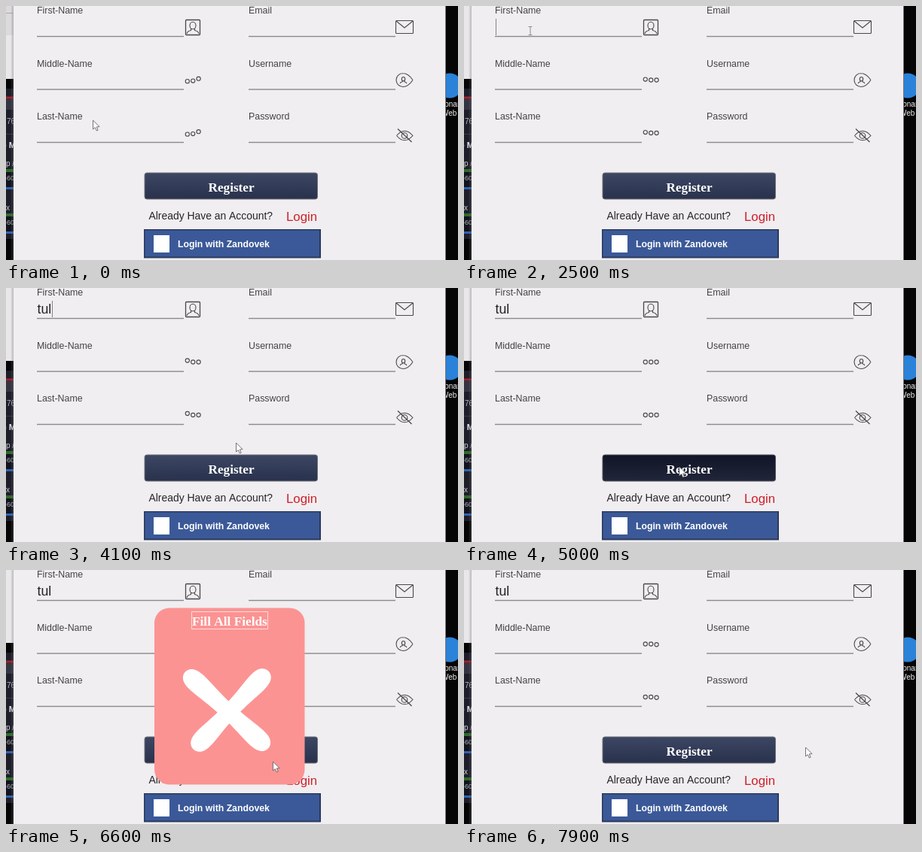
Animation, 600 px wide and 338 px high, one loop 8 s. Source, as an HTML page with a canvas:

```html
<!DOCTYPE html>
<html lang="en">
<head>
<meta charset="utf-8">
<title>Register form</title>
<style>
html, body { margin: 0; width: 100%; height: 100%; overflow: hidden; background: #000; }
canvas { display: block; width: 600px; height: 338px; }
</style>
</head>
<body>
<canvas id="stage" width="600" height="338"></canvas>
<script>
const c = document.getElementById('stage').getContext('2d');
const LOOP = 8000, POPUP_ON = 5200, POPUP_OFF = 7400;
const SANS = '"Liberation Sans", Arial, sans-serif';
const SERIF = '"Liberation Serif", "Times New Roman", serif';
const INK = '#4a484c';

// time, x, y of the pointer
const PATH = [
  [0, 115, 152], [300, 115, 152], [1500, 88, 33], [3200, 88, 33],
  [4100, 305, 206], [4500, 285, 238], [5700, 286, 238],
  [6600, 354, 255], [7200, 453, 236], [8000, 453, 236]
];
const TYPED = 'tul', KEYS = [2700, 2850, 3000];
const FOCUS = 2200, BLUR = 4950, BLINK = 530;

function rect(x, y, w, h, fill) { c.fillStyle = fill; c.fillRect(x, y, w, h); }

function text(s, x, y, font, fill) {
  c.font = font; c.fillStyle = fill; c.fillText(s, x, y);
}

function round(x, y, w, h, r) { c.beginPath(); c.roundRect(x, y, w, h, r); }

function circle(x, y, r) { c.beginPath(); c.arc(x, y, r, 0, 7); }

function ink(w = 1.1, color = INK) { c.lineWidth = w; c.strokeStyle = color; c.stroke(); }

function shade(x0, y0, x1, y1, a, b) {
  const g = c.createLinearGradient(x0, y0, x1, y1);
  g.addColorStop(0, a); g.addColorStop(1, b);
  return g;
}

function pointer(t) {
  const i = Math.max(1, PATH.findIndex(p => p[0] > t));
  const [t0, x0, y0] = PATH[i - 1], [t1, x1, y1] = PATH[i];
  const u = (t - t0) / (t1 - t0), e = u * u * (3 - 2 * u);
  return { x: x0 + (x1 - x0) * e, y: y0 + (y1 - y0) * e };
}

function desktop(t) {
  rect(0, 0, 600, 338, '#050506');
  rect(0, 0, 12, 97, '#e9e7e9');
  if (t < 600) {
    rect(0, 0, 12, 39, '#dcdadc');
    rect(0, 9, 9, 1, '#a9a9ab');
  }
  rect(0, 110, 12, 200, '#1d1e2a');
  rect(0, 120.5, 12, 3, '#a3222c');
  rect(0, 124, 12, 14, '#343542');
  text('76', 1, 157, '10px ' + SANS, '#b5b5bb');
  rect(0, 170, 12, 1, '#3a3b48');
  text('p M', -6, 189, 'bold 11px ' + SANS, '#e4e4e8');
  [['p /', 213], ['x', 272]].forEach(([s, y]) => {
    text(s, 0, y, '10px ' + SANS, '#d2d2d6');
    rect(0, y + 4, 12, 4, '#2f6a29');
    rect(0, y + 8, 12, 20, '#12131c');
    text('-60', -2, y + 19, '9px ' + SANS, '#b4b5bc');
    rect(0, y + 28, 12, 3, '#2f62b4');
  });
  circle(589, 106, 16.5); c.fillStyle = '#2b82d9'; c.fill();
  text('lonar', 580, 134, '10px ' + SANS, '#eee');
  text('Web', 578, 146, '10px ' + SANS, '#eee');
}

function field(label, x, y) {
  text(label, x, y, '12.4px ' + SANS, '#454346');
  rect(x, y + 29.8, 195, 1.4, '#8b898c');
}

// bust: head, neck and shoulders
function person(x, y, s) {
  c.beginPath();
  c.ellipse(x, y - 2.5 * s, 4 * s, 4.8 * s, 0, 0, 7);
  c.moveTo(x - 8 * s, y + 8.5 * s);
  c.quadraticCurveTo(x - 7.5 * s, y + 5 * s, x - 2.5 * s, y + 4 * s);
  c.lineTo(x - 2.5 * s, y + 1.5 * s);
  c.moveTo(x + 2.5 * s, y + 1.5 * s);
  c.lineTo(x + 2.5 * s, y + 4 * s);
  c.quadraticCurveTo(x + 7.5 * s, y + 5 * s, x + 8 * s, y + 8.5 * s);
  ink();
}

function dots(t, y) {
  const phase = (t + 550) % 1500;
  for (let i = 0; i < 3; i++) {
    const q = (phase - i * 170) / 650;
    const dy = q > 0 && q < 1 ? -2 * Math.sin(q * 2 * Math.PI) : 0;
    circle(240.8 + i * 7.4, y + dy, 2.6);
    ink();
  }
}

function icons(t) {
  round(238.5, 18.5, 19, 20, 1); ink(1.3);
  person(248, 28.5, 1);
  round(517.5, 19.5, 23, 17, 1); ink();
  c.beginPath(); c.moveTo(518, 20); c.lineTo(529, 29); c.lineTo(540, 20); ink();

  c.beginPath();
  c.moveTo(540, 98.5);
  c.quadraticCurveTo(534, 89.5, 526.5, 89.5);
  c.arc(527, 98.5, 9, -Math.PI / 2, Math.PI / 2, true);
  c.quadraticCurveTo(534, 107.5, 540, 98.5);
  ink();
  person(527.5, 98.5, 0.55);

  c.beginPath();
  c.moveTo(518.5, 172.5);
  c.quadraticCurveTo(529, 160, 540, 172.5);
  c.quadraticCurveTo(529, 185, 518.5, 172.5);
  ink();
  circle(529, 172.5, 3.8); ink();
  c.beginPath(); c.moveTo(520, 163.5); c.lineTo(538.5, 181); ink(1.3);

  dots(t, 98.5);
  dots(t, 169);
}

function entry(t) {
  const n = KEYS.filter(k => k <= t).length;
  const s = TYPED.slice(0, n);
  text(s, 41.5, 34, '17.8px ' + SANS, '#222');
  if (t < FOCUS || t >= BLUR) return;
  const since = t - (n ? KEYS[n - 1] : FOCUS);
  if (since % (2 * BLINK) < BLINK)
    rect(Math.round(42 + c.measureText(s).width), 17, 1, 22, '#858388');
}

function buttons(hover) {
  round(184, 222, 229.5, 35, 3);
  c.fillStyle = hover ? shade(0, 222, 0, 257, '#101426', '#22263a')
                      : shade(0, 222, 0, 257, '#3c4763', '#29314c');
  c.fill();
  ink(1, hover ? '#55565f' : '#74747c');
  text('Register', 268.5, 246.5, 'bold 17.2px ' + SERIF, '#fff');

  text('Already Have an Account?', 189.5, 284, '13.9px ' + SANS, '#262428');
  text('Login', 372, 285.5, '16.8px ' + SANS, '#cf1f2b');

  rect(183, 297, 235, 38.5, '#2b3a5c');
  rect(184.5, 298.5, 231.5, 35, '#3b5998');
  rect(196, 305, 21, 23, '#fff');
  text('Login with Zandovek', 228, 320.5, 'bold 12.25px ' + SANS, '#fff');
}

function form(t, hover) {
  rect(6, 0, 4, 338, shade(6, 0, 10, 0, 'rgba(110,110,115,0)', 'rgba(110,110,115,.4)'));
  rect(10, 0, 573, 338, '#f0eef0');
  rect(583, 0, 1, 338, '#77757a');
  ['First-Name', 'Middle-Name', 'Last-Name'].forEach((s, i) => field(s, 41, 10 + 70.5 * i));
  ['Email', 'Username', 'Password'].forEach((s, i) => field(s, 322, 10 + 70.5 * i));
  icons(t);
  entry(t);
  buttons(hover);
}

// one arm of the cross, slim in the middle; a higher n gives blunter ends
function arm(x, y, angle, len, n) {
  c.save();
  c.translate(x, y);
  c.rotate(angle);
  c.beginPath();
  for (let i = 0; i < 120; i++) {
    const a = i / 60 * Math.PI, u = Math.cos(a);
    const h = (10.5 + 8 * u * u) * Math.sqrt(Math.max(0, 1 - Math.abs(u) ** n));
    c.lineTo(u * len, Math.sin(a) < 0 ? -h : h);
  }
  c.closePath();
  c.fillStyle = '#fff';
  c.fill();
  c.restore();
}

function popup(t) {
  round(197, 50.5, 199.5, 235, 20);
  c.fillStyle = '#fc9393';
  c.fill();
  c.beginPath(); c.rect(246.5, 55.5, 101, 23); ink(1, '#fbdcdc');
  text('Fill All Fields', 247, 73.5, 'bold 17.3px ' + SERIF, '#fff');
  const k = (1 - Math.cos((t - 5700) / 900 * Math.PI)) / 2;
  const n = 3 + 2 * k;
  arm(293, 187.5 - k, 0.745, 77 - 2 * k, n);
  arm(299.5 - k, 187.5 - k, -0.81, 74 - 2 * k, n);
}

function cursor(p) {
  if (p.x > 41 && p.x < 236 && p.y > 14 && p.y < 42) {
    c.beginPath();
    c.moveTo(p.x - 2.5, p.y - 5.5); c.lineTo(p.x + 2.5, p.y - 5.5);
    c.moveTo(p.x, p.y - 5.5); c.lineTo(p.x, p.y + 5.5);
    c.moveTo(p.x - 2.5, p.y + 5.5); c.lineTo(p.x + 2.5, p.y + 5.5);
    ink(1, '#8d8b90');
    return;
  }
  c.save();
  c.translate(p.x + 0.5, p.y);
  c.beginPath();
  [[0, 0], [0, 12], [2.8, 9.6], [4.8, 14], [6.6, 13.2], [4.8, 8.9], [8.5, 8.6]]
    .forEach(q => c.lineTo(...q));
  c.closePath();
  c.fillStyle = '#fff';
  c.fill();
  ink(0.9, '#66646a');
  c.restore();
}

function draw(now) {
  const t = now % LOOP, p = pointer(t);
  const open = t >= POPUP_ON && t < POPUP_OFF;
  const hover = !open && p.x > 184 && p.x < 414 && p.y > 222 && p.y < 257;
  desktop(t);
  form(t, hover);
  if (open) popup(t);
  cursor(p);
}

const start = performance.now();
function tick() {
  draw(performance.now() - start);
  requestAnimationFrame(tick);
}
tick();
</script>
</body>
</html>
```
